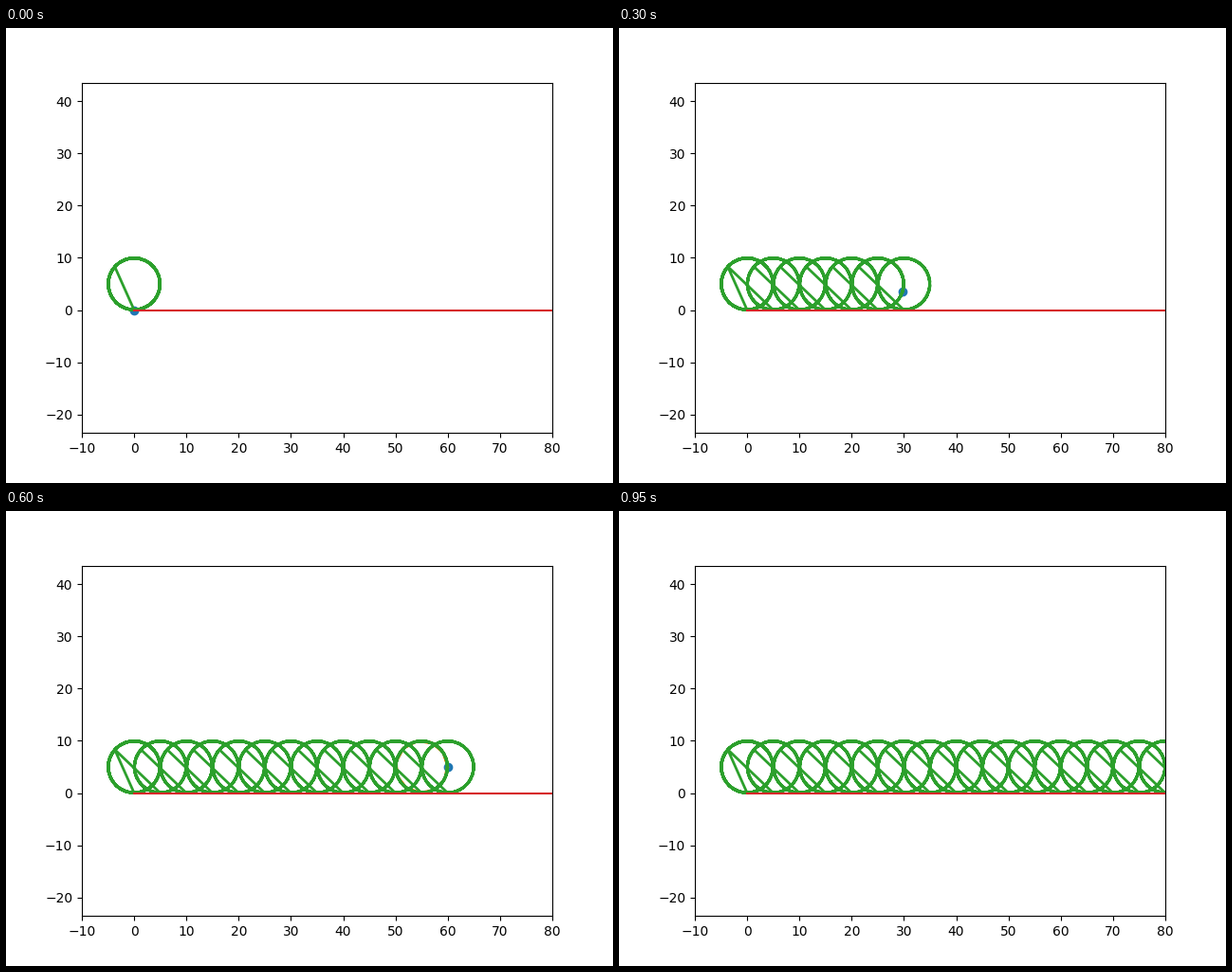
A matplotlib script that plays this animation: 640x480 px, repeating every 2.77 s.

```python
import numpy as np
import matplotlib.pyplot as plt
from matplotlib.animation import FuncAnimation

R = 5            # wheel radius
TICK = 10        # ms per drawn frame
STEP = 50        # ms per roll step
LOOP = 2770      # ms
LAST = 19        # the wheel has left the view by this step

plt.rcParams["font.family"] = "DejaVu Sans"
fig, ax = plt.subplots(figsize=(6.4, 4.8), dpi=100)
half = 45 * 369.6 / 496          # equal scale on both axes
ax.set_xlim(-10, 80)
ax.set_ylim(10 - half, 10 + half)

dot, = ax.plot([], [], "o", color="C0")
wheel, = ax.plot([], [], color="C1", lw=2)
trail, = ax.plot([], [], color="C2", lw=2)
ax.plot([0, 100], [0, 0], color="C3")


def rim(turn, angles):
    """Points on the wheel after it has rolled through `turn` radians."""
    return R * (turn - np.sin(angles)), R * (1 - np.cos(angles))


SPIN = np.linspace(0, 40, 100)
TURNS = np.r_[0, np.arange(LAST + 1)]   # the first circle is traced twice
TRAIL_X = np.concatenate([rim(t, SPIN)[0] for t in TURNS])
TRAIL_Y = np.tile(rim(0, SPIN)[1], len(TURNS))


def update(i):
    step = min(i * TICK // STEP, LAST)
    turn = max(step - 1, 0)             # dot and wheel lag one step
    x, y = rim(turn, turn)
    dot.set_data([x], [y])
    wheel.set_data(*rim(turn, np.linspace(0, turn, 20)))
    n = (step + 2) * len(SPIN)
    trail.set_data(TRAIL_X[:n], TRAIL_Y[:n])
    return dot, wheel, trail


anim = FuncAnimation(fig, update, frames=LOOP // TICK, interval=TICK,
                     init_func=lambda: update(0), repeat=True, repeat_delay=0)
plt.show()
```
